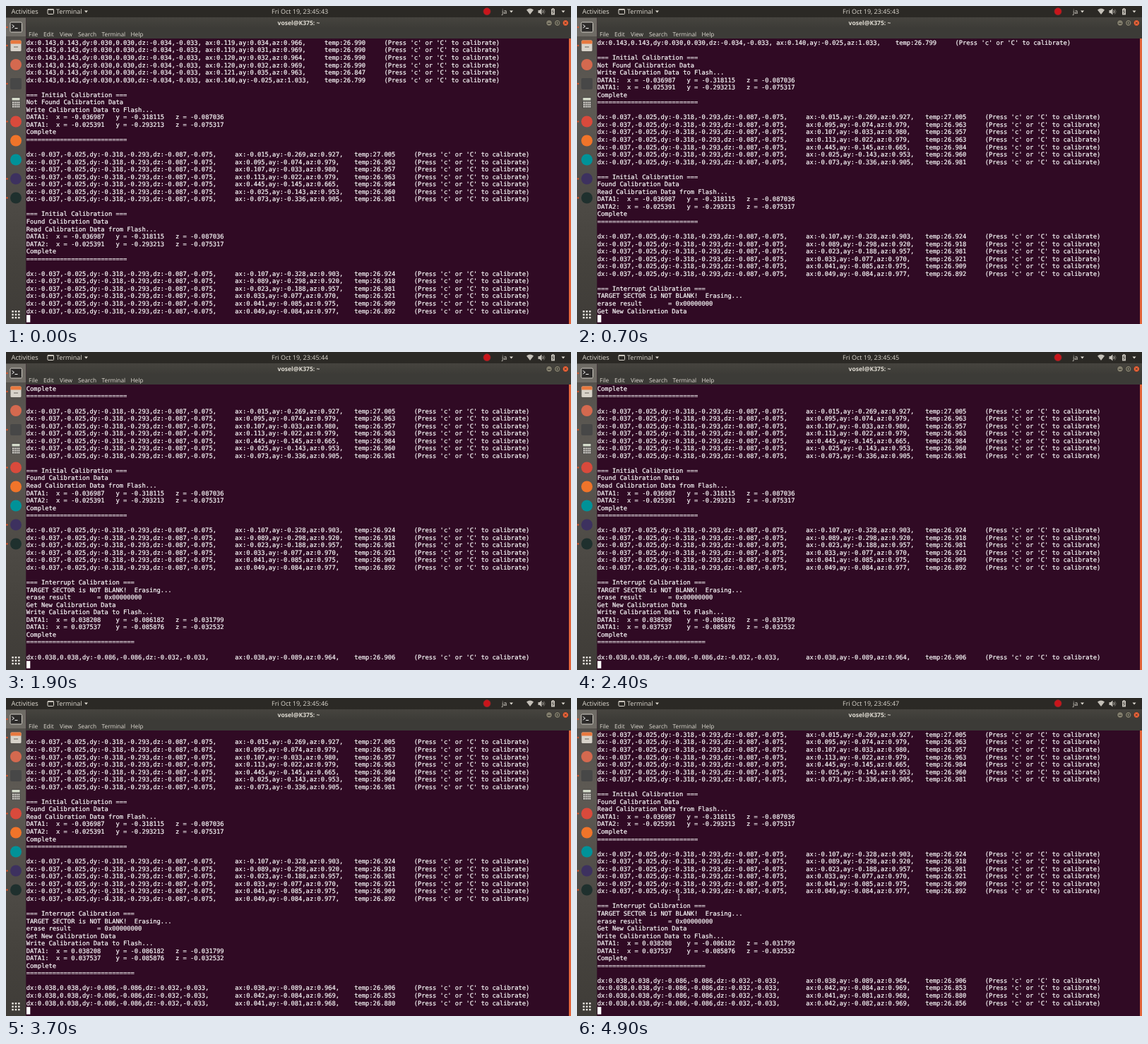
Recreate the animation shown at these times as an HTML page. Size 800 px wide and 450 px high, loop 5 s.

```html
<!DOCTYPE html>
<html lang="en">
<head>
<meta charset="utf-8">
<title>Calibration log</title>
<style>
html, body { margin: 0; width: 100%; height: 100%; overflow: hidden; background: #300a24; }
svg { position: absolute; left: 0; top: 0; }
text { font-family: "Open Sans", "Noto Sans", sans-serif; fill: #dfdbd2; text-rendering: geometricPrecision; }
#log {
  position: absolute; left: 28.8px; top: 47.9px; margin: 0;
  font: 8.773px/10.542px "DejaVu Sans Mono", monospace;
  color: #fff; -webkit-text-stroke: .2px #fff;
  tab-size: 8; white-space: pre; text-rendering: geometricPrecision;
}
</style>
</head>
<body>
<svg width="800" height="450" viewBox="0 0 800 450">
  <defs>
    <linearGradient id="rock" x2="0" y2="1">
      <stop offset="0" stop-color="#4f4c48"/>
      <stop offset=".3" stop-color="#5e5a54"/>
      <stop offset=".6" stop-color="#4e4b46"/>
      <stop offset=".8" stop-color="#45423d"/>
      <stop offset="1" stop-color="#3f3c38"/>
    </linearGradient>
    <linearGradient id="bar" x2="0" y2="1">
      <stop offset="0" stop-color="#46443f"/>
      <stop offset="1" stop-color="#3c3b37"/>
    </linearGradient>
  </defs>
  <rect width="28.5" height="450" fill="url(#rock)"/>
  <rect width="800" height="16" fill="#2b2925"/>
  <rect x="28.5" y="16" width="771.5" height="16" fill="url(#bar)"/>
  <rect x="28.5" y="32" width="771.5" height="14" fill="#3c3b37"/>
  <rect x="28.5" y="46" width="771.5" height="404" fill="#300a24"/>
  <rect x="797" y="46" width="3" height="404" fill="#e2653a"/>

  <!-- top panel -->
  <g font-size="9">
    <text x="7.5" y="11" font-size="9.3">Activities</text>
    <text x="71" y="11">Terminal</text>
    <text id="clock" x="376" y="11"></text>
    <text x="702" y="11">ja</text>
  </g>
  <path d="M111 6.5h5l-2.5 3zM713 6.5h5l-2.5 3zM786.5 6.5h5l-2.5 3z" fill="#dfdbd2"/>
  <rect x="59" y="4.5" width="8.5" height="7" rx="1" fill="none" stroke="#dfdbd2"/>
  <path d="M59 5h8.5" stroke="#dfdbd2" stroke-width="1.5"/>
  <circle cx="681" cy="7.7" r="5" fill="#c9151b" stroke="#8d2a2a" stroke-width=".8"/>
  <g fill="#c4c0b8">
    <path d="M737 5.5q5-4 10 0l-5 6.5z"/>
    <path d="M753.5 6h2l3-2.5v9l-3-2.5h-2z"/>
    <path d="M772 4h1.5v-1h2v1h1.5v8.500h-5z"/>
  </g>
  <path d="M760 6q1.500 2 0 4" fill="none" stroke="#c4c0b8"/>
  <path d="M761.500 4.500q3 3.500 0 7" fill="none" stroke="#77746e"/>
  <path d="M775 5l-1.500 3h2l-1.500 3" fill="none" stroke="#2b2925" stroke-width=".8"/>

  <!-- window frame -->
  <text x="414.5" y="27.2" font-size="8.6" font-weight="700" text-anchor="middle">vosel@K375: ~</text>
  <g font-size="8.3">
    <text x="32" y="43">File</text>
    <text x="53" y="43">Edit</text>
    <text x="76" y="43">View</text>
    <text x="102" y="43">Search</text>
    <text x="135.5" y="43">Terminal</text>
    <text x="176.5" y="43">Help</text>
  </g>
  <g stroke="#2e2c28" stroke-width=".7">
    <circle cx="769" cy="24" r="4.2" fill="#84806f"/>
    <circle cx="780.7" cy="24" r="4.2" fill="#84806f"/>
    <circle cx="792.3" cy="24" r="4.2" fill="#ee6338"/>
  </g>
  <path d="M767 24.5h4M779 22.500h3.500v3h-3.500zM790.700 22.400l3.200 3.200m0-3.200l-3.200 3.200" fill="none" stroke="#33312c" stroke-width=".9"/>

  <!-- dock -->
  <rect y="17" width="28" height="26" fill="#8b8780" opacity=".5"/>
  <rect x="6" y="23" width="16.5" height="14" rx="1.5" fill="#2d2b2a" stroke="#d0ccc4"/>
  <path d="M8.5 26.5l3 2.200-3 2.200M12.500 31.500h4" fill="none" stroke="#fff"/>
  <rect x="6.5" y="48.5" width="15" height="15.5" rx="1.5" fill="#d8d3ca"/>
  <path d="M6.5 50q0-1.500 1.500-1.500h12q1.500 0 1.500 1.500v3.500h-15z" fill="#e8793f"/>
  <path d="M11 58h6" stroke="#8e8980" stroke-width="1.5"/>
  <circle cx="14" cy="83" r="8" fill="#d4694f"/>
  <rect x="6" y="102" width="16" height="16" rx="2" fill="#474747"/>
  <rect x="7" y="128.5" width="14" height="16.5" rx="1.5" fill="#55534f"/>
  <rect x="8.5" y="130" width="11" height="3.5" fill="#d5dccb"/>
  <path d="M9 136.5h10.500M9 139.500h10.500M9 142.500h10.500" stroke="#e4e1dc" stroke-width="2" stroke-dasharray="2 .8"/>
  <circle cx="14" cy="163.5" r="8" fill="#d94a3c"/>
  <circle cx="14" cy="190.5" r="8" fill="#f0742a"/>
  <circle cx="14" cy="217.5" r="8" fill="#009298"/>
  <circle cx="14" cy="244.5" r="8" fill="#3d315f"/>
  <circle cx="14" cy="271.5" r="8" fill="#1f302e"/>
  <g id="dots" fill="#e0562c"></g>
  <g id="grid" fill="#ece9e4"></g>
</svg>
<pre id="log"></pre>
<svg width="800" height="450" viewBox="0 0 800 450">
  <rect x="29" y="437.2" width="5.3" height="10.4" fill="#fff"/>
  <path id="beam" d="M142.5 277.500q1.500 0 1.500 1v6.500q0 1-1.500 1M145.500 277.500q-1.500 0-1.500 1M144 285q0 1 1.500 1" fill="none" stroke="#fff" stroke-width=".8"/>
</svg>
<script>
const $ = id => document.getElementById(id);
const PERIOD = 5000, ROWS = 37;

$('dots').innerHTML = [30, 56, 110, 163.5, 244.5, 271.5]
  .map(y => `<circle cx="1.5" cy="${y}" r="1.2"/>`).join('');
for (let i = 0; i < 9; i++)
  $('grid').innerHTML += `<rect x="${8.3 + i % 3 * 4.4}" y="${431 + (i / 3 | 0) * 4.4}" width="2.5" height="2.5" rx=".6"/>`;

const rows = (offsets, samples) => samples.map(s => {
  const [x, y, z, temp] = s.split(' ');
  return `${offsets},\tax:${x},ay:${y},az:${z},\ttemp:${temp}\t(Press 'c' or 'C' to calibrate)`;
});
const data = (n, x, y, z) => `DATA${n}:\tx = ${x}\ty = ${y}\tz = ${z}`;
const block = (kind, steps, a, b) => {
  const head = `=== ${kind} Calibration ===`;
  return ['', head, ...steps, a, b, 'Complete', '='.repeat(head.length), ''];
};
const WRITE = 'Write Calibration Data to Flash...';
const OLD = 'dx:-0.037,-0.025,dy:-0.318,-0.293,dz:-0.087,-0.075';
const first = ['-0.036987', '-0.318115', '-0.087036'];
const second = ['-0.025391', '-0.293213', '-0.075317'];

const lines = [
  ...rows('dx:0.143,0.143,dy:0.030,0.030,dz:-0.034,-0.033', [
    '0.119 0.034 0.966 26.990', '0.119 0.031 0.969 26.990', '0.120 0.032 0.964 26.990',
    '0.120 0.032 0.969 26.990', '0.121 0.035 0.963 26.847', '0.140 -0.025 1.033 26.799']),
  ...block('Initial', ['Not Found Calibration Data', WRITE], data(1, ...first), data(1, ...second)),
  ...rows(OLD, [
    '-0.015 -0.269 0.927 27.005', '0.095 -0.074 0.979 26.963', '0.107 -0.033 0.980 26.957',
    '0.113 -0.022 0.979 26.963', '0.445 -0.145 0.665 26.984', '-0.025 -0.143 0.953 26.960',
    '-0.073 -0.336 0.905 26.981']),
  ...block('Initial', ['Found Calibration Data', 'Read Calibration Data from Flash...'],
    data(1, ...first), data(2, ...second)),
  ...rows(OLD, [
    '-0.107 -0.328 0.903 26.924', '-0.089 -0.298 0.920 26.918', '-0.023 -0.188 0.957 26.981',
    '0.033 -0.077 0.970 26.921', '0.041 -0.085 0.975 26.909', '0.049 -0.084 0.977 26.892']),
  ...block('Interrupt', ['TARGET SECTOR is NOT BLANK!  Erasing...', 'erase result       = 0x00000000',
    'Get New Calibration Data', WRITE],
    data(1, '0.038208', '-0.086182', '-0.031799'), data(1, '0.037537', '-0.085876', '-0.032532')),
  ...rows('dx:0.038,0.038,dy:-0.086,-0.086,dz:-0.032,-0.033', [
    '0.038 -0.089 0.964 26.906', '0.042 -0.084 0.969 26.853',
    '0.041 -0.081 0.968 26.880', '0.042 -0.082 0.969 26.856'])
];

// Number of lines printed so far; samples arrive every 1.2 s after calibration
function printed(t) {
  if (t < 300) return 37;
  if (t < 600) return 40;
  if (t < 1000) return 42;
  return 48 + Math.floor((t - 100) / 1200);
}

let shown = -1;
function draw() {
  const t = performance.now() % PERIOD;
  const n = printed(t);
  if (n !== shown) $('log').textContent = lines.slice(n - ROWS, n).join('\n');
  shown = n;
  $('clock').textContent = 'Fri Oct 19, 23:45:' + (43 + Math.max(0, Math.floor((t - 100) / 1000)));
  $('beam').style.visibility = t < 3400 ? 'hidden' : 'visible';
  requestAnimationFrame(draw);
}
draw();
</script>
</body>
</html>
```
